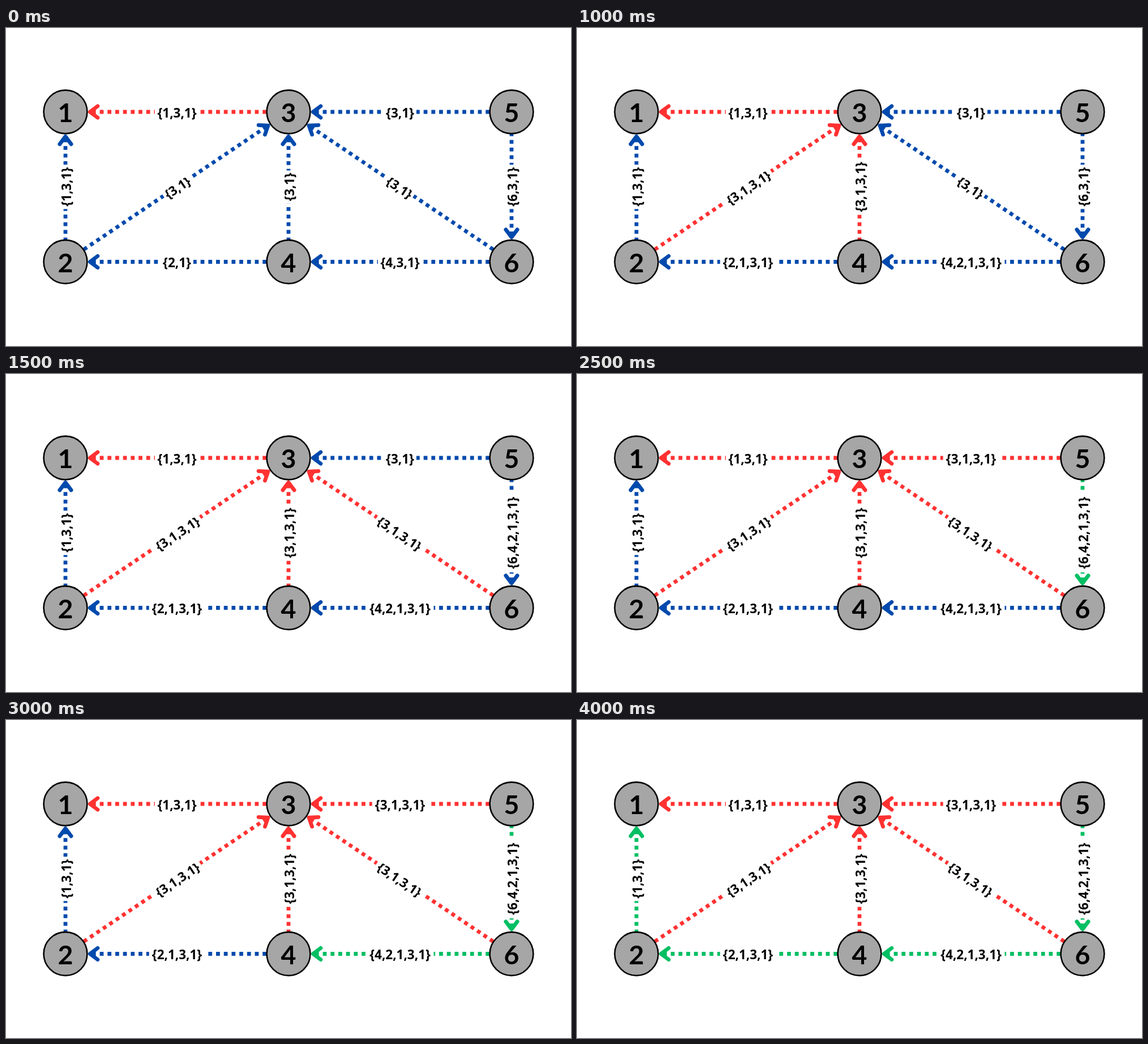
An HTML page for the animation above (4.5 s loop, 998x561 px).

```html
<!DOCTYPE html>
<html lang="en">
<head>
<meta charset="utf-8">
<title>Path updates</title>
<style>
  html, body { margin: 0; width: 100%; height: 100%; overflow: hidden; background: #fff; }
  svg { display: block; width: 100vw; height: 100vh; }
  text { text-anchor: middle; fill: #000; }
  .label { font: 700 22.5px "Noto Sans", "Open Sans", sans-serif; }
  .digit { font: 700 46.5px Lato, Carlito, sans-serif; }
  .node { fill: #a6a6a6; stroke: #000; stroke-width: 2.6; }
  .line, .head { fill: none; stroke-width: 6.76; }
  .head { stroke-linecap: round; stroke-linejoin: round; }
</style>
</head>
<body>
<svg id="stage" viewBox="0 0 998 561"></svg>
<script>
const BLUE = '#004aad', RED = '#ff3131', GREEN = '#00bf63';
const STEP = 500, LOOP = 4500;
const WEIGHT = 6.76, TIP_GAP = 40;
const NODES = { 1: [105, 148], 2: [105, 412.5], 3: [499, 148], 4: [499, 412.5], 5: [893, 148], 6: [893, 412.5] };

// color and next hold [step, value]: the step at which the value takes over.
const EDGES = [
  { from: 3, to: 1, path: '1,3,1', color: [0, RED] },
  { from: 2, to: 3, path: '3,1', color: [1, RED], next: [1, '3,1,3,1'] },
  { from: 4, to: 3, path: '3,1', color: [2, RED], next: [2, '3,1,3,1'] },
  { from: 6, to: 3, path: '3,1', color: [3, RED], next: [3, '3,1,3,1'] },
  { from: 5, to: 3, path: '3,1', color: [4, RED], next: [4, '3,1,3,1'] },
  { from: 5, to: 6, path: '6,3,1', color: [5, GREEN], next: [3, '6,4,2,1,3,1'] },
  { from: 6, to: 4, path: '4,3,1', color: [6, GREEN], next: [2, '4,2,1,3,1'] },
  { from: 4, to: 2, path: '2,1', color: [7, GREEN], next: [1, '2,1,3,1'] },
  { from: 2, to: 1, path: '1,3,1', color: [8, GREEN] }
];

const stage = document.getElementById('stage');

function add(parent, tag, attrs, text) {
  const el = document.createElementNS('http://www.w3.org/2000/svg', tag);
  for (const key in attrs) el.setAttribute(key, attrs[key]);
  if (text) el.textContent = text;
  parent.appendChild(el);
  return el;
}

function valueAt(step, first, change) {
  return change && step >= change[0] ? change[1] : first;
}

function buildEdge(edge) {
  const [x1, y1] = NODES[edge.from], [x2, y2] = NODES[edge.to];
  const length = Math.hypot(x2 - x1, y2 - y1);
  const angle = Math.atan2(y2 - y1, x2 - x1) * 180 / Math.PI;
  const start = x1 === x2 ? 36 : 39;
  const end = length - TIP_GAP;
  const tip = end - WEIGHT / 2;
  const back = tip - 2 * WEIGHT, wing = 1.5 * WEIGHT;

  // A whole number of dash periods fits the line.
  const span = end - start;
  const period = span / Math.round(span / (2 * WEIGHT));

  const arrow = add(stage, 'g', { transform: `translate(${x1} ${y1}) rotate(${angle})` });
  edge.line = add(arrow, 'path', {
    class: 'line', d: `M${start} 0H${tip}`, 'stroke-dasharray': `${WEIGHT} ${period - WEIGHT}`
  });
  edge.mask = add(arrow, 'rect', { y: -12, height: 24, fill: '#fff' });
  edge.head = add(arrow, 'path', { class: 'head', d: `M${back} ${-wing}L${tip} 0L${back} ${wing}` });
  edge.middle = length / 2;

  // Labels read left to right, or upwards on vertical edges.
  let turn = angle;
  if (turn >= 90) turn -= 180;
  if (turn < -90) turn += 180;
  const spot = `translate(${(x1 + x2) / 2} ${(y1 + y2) / 2}) rotate(${turn})`;
  edge.label = add(stage, 'text', { class: 'label', y: 9.8, transform: spot });
}

function buildNode(id) {
  const [cx, cy] = NODES[id];
  add(stage, 'circle', { class: 'node', cx, cy, r: 38.4 });
  add(stage, 'text', { class: 'digit', x: cx, y: cy + 18 }, id);
}

function draw(time) {
  const step = Math.floor(time % LOOP / STEP);
  for (const edge of EDGES) {
    const color = valueAt(step, BLUE, edge.color);
    const path = valueAt(step, edge.path, edge.next);
    const half = 8.5 + 10.2 * path.split(',').length;
    edge.line.setAttribute('stroke', color);
    edge.head.setAttribute('stroke', color);
    edge.mask.setAttribute('x', edge.middle - half);
    edge.mask.setAttribute('width', 2 * half);
    edge.label.textContent = `{${path}}`;
  }
}

EDGES.forEach(buildEdge);
Object.keys(NODES).forEach(buildNode);
draw(0);

let origin;
function tick(now) {
  origin ??= now;
  draw(now - origin);
  requestAnimationFrame(tick);
}
requestAnimationFrame(tick);
</script>
</body>
</html>
```
